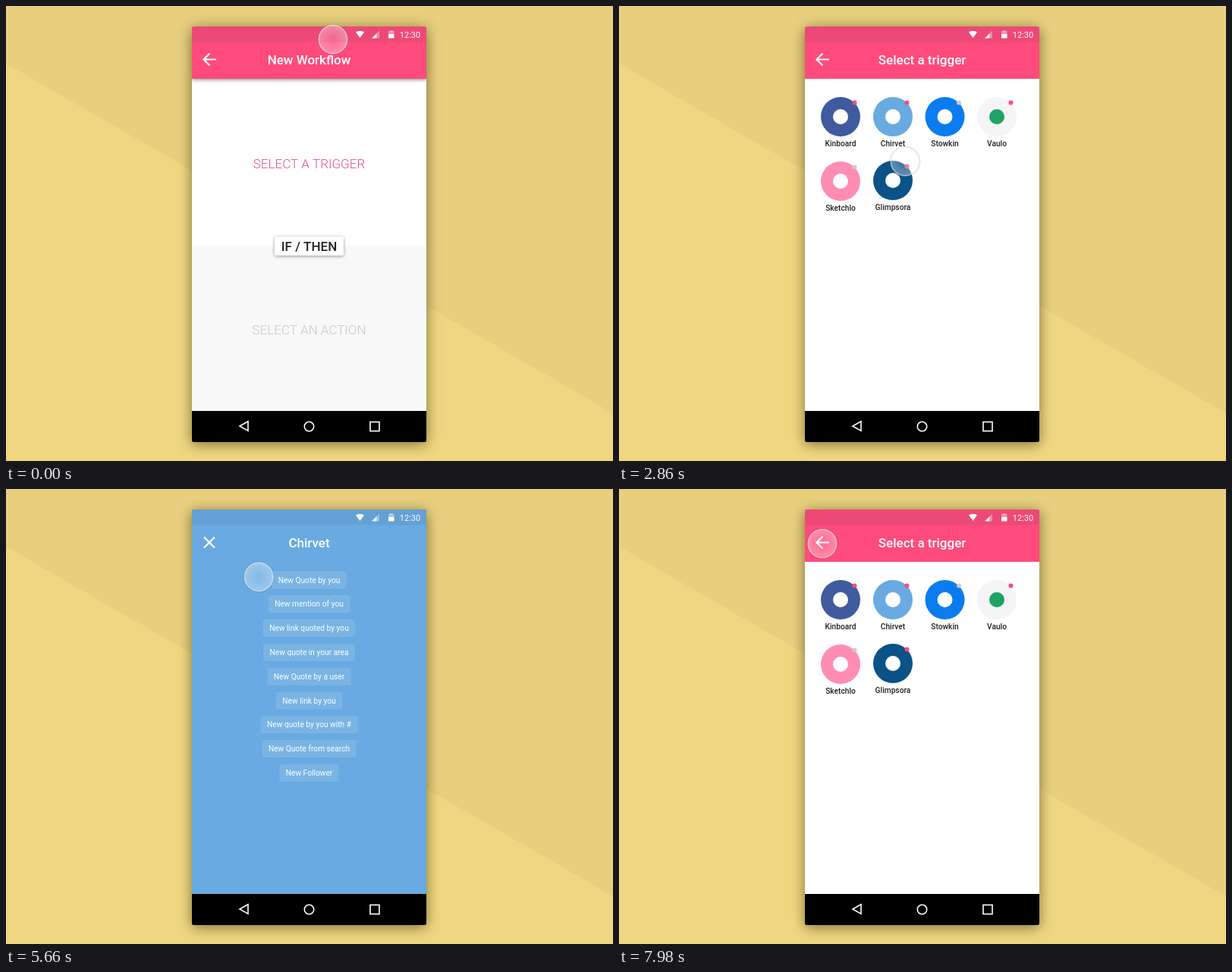
An HTML page with a canvas that plays this animation: 800 px wide and 600 px high, repeating every 8 s.

```html
<!DOCTYPE html>
<html lang="en">
<head>
<meta charset="utf-8">
<title>Workflow builder</title>
<style>
  html, body { margin: 0; width: 100%; height: 100%; overflow: hidden; background: #efd781; }
  canvas { display: block; width: 800px; height: 600px; }
</style>
</head>
<body>
<canvas id="stage" width="800" height="600"></canvas>
<script>
const ctx = document.getElementById('stage').getContext('2d');
const LOOP = 8000, PINK = '#ff4b7b', BLUE = '#68aae1';
const PHONE = { x: 245, y: 27, w: 309, h: 548 };
const MID = 399.5, NAV_TOP = 534;

const apps = [
  { name: 'Kinboard', x: 292, y: 146, fill: '#3f5a9d', dot: PINK },
  { name: 'Chirvet', x: 361, y: 146, fill: BLUE, dot: PINK },
  { name: 'Stowkin', x: 429.5, y: 146, fill: '#0a7cf0', dot: '#c9ccd0' },
  { name: 'Vaulo', x: 498, y: 146, fill: '#f5f5f5', dot: PINK, mark: '#1da362' },
  { name: 'Sketchlo', x: 292, y: 231, fill: '#ff8db3', dot: '#c9ccd0' },
  { name: 'Glimpsora', x: 361, y: 230, fill: '#0a5287', dot: PINK },
];
const chosen = apps[1];
const chips = [
  'New Quote by you', 'New mention of you', 'New link quoted by you',
  'New quote in your area', 'New Quote by a user', 'New link by you',
  'New quote by you with #', 'New Quote from search', 'New Follower',
];

// Timing helpers
const span = (t, from, to) => Math.min(1, Math.max(0, (t - from) / (to - from)));
const smooth = p => p * p * (3 - 2 * p);
const easeOut = p => 1 - (1 - p) ** 3;
const lerp = (a, b, p) => a + (b - a) * p;

// Drawing helpers
function withAlpha(alpha, draw) {
  if (alpha <= 0) return;
  ctx.save();
  ctx.globalAlpha *= alpha;
  draw();
  ctx.restore();
}
function rect(x, y, w, h, fill) {
  ctx.fillStyle = fill;
  ctx.fillRect(x, y, w, h);
}
function roundRect(x, y, w, h, r, fill) {
  ctx.beginPath();
  ctx.roundRect(x, y, w, h, r);
  ctx.fillStyle = fill;
  ctx.fill();
}
function disc(x, y, r, fill) {
  ctx.beginPath();
  ctx.arc(x, y, r, 0, Math.PI * 2);
  ctx.fillStyle = fill;
  ctx.fill();
}
function polygon(points, fill) {
  ctx.beginPath();
  points.forEach(([x, y]) => ctx.lineTo(x, y));
  ctx.closePath();
  ctx.fillStyle = fill;
  ctx.fill();
}
function strokeLines(lines, width) {
  ctx.beginPath();
  for (const [first, ...rest] of lines) {
    ctx.moveTo(...first);
    rest.forEach(p => ctx.lineTo(...p));
  }
  ctx.lineWidth = width;
  ctx.strokeStyle = '#fff';
  ctx.stroke();
}
function text(str, x, y, size, weight, fill) {
  ctx.font = `${weight} ${size}px Roboto, sans-serif`;
  ctx.textAlign = 'center';
  ctx.textBaseline = 'alphabetic';
  ctx.fillStyle = fill;
  ctx.fillText(str, x, y + size * 0.355);
}
function shadowed(color, blur, dy, draw) {
  ctx.save();
  ctx.shadowColor = color;
  ctx.shadowBlur = blur;
  ctx.shadowOffsetY = dy;
  draw();
  ctx.restore();
}
const title = (str, y = 70.5) => text(str, MID, y, 17, 500, '#fff');

function drawBackdrop() {
  rect(0, 0, 800, 600, '#efd781');
  polygon([[0, 0], [800, 0], [800, 537], [0, 76]], '#e7cf7e');
  shadowed('rgba(50,40,0,.6)', 18, 3, () =>
    roundRect(PHONE.x, PHONE.y, PHONE.w, PHONE.h, 3, '#000'));
}

function drawStatus() {
  rect(PHONE.x, PHONE.y, PHONE.w, 20.5, 'rgba(60,60,80,.09)');
  polygon([[461, 34.5], [464, 33], [469, 33], [472, 34.5], [466.5, 42]], '#fff');
  polygon([[482, 42.5], [492, 42.5], [492, 32.5]], 'rgba(255,255,255,.35)');
  polygon([[482, 42.5], [488.5, 42.5], [488.5, 36]], 'rgba(255,255,255,.85)');
  rect(506, 32, 3.5, 2, 'rgba(255,255,255,.4)');
  rect(504, 33, 7.5, 4, 'rgba(255,255,255,.4)');
  rect(504, 37, 7.5, 5.5, '#fff');
  text('12:30', 532.5, 37.8, 11, 400, '#fff');
}

function drawNav() {
  roundRect(PHONE.x, NAV_TOP, PHONE.w, 41, [0, 0, 3, 3], '#000');
  strokeLines([[[308, 554], [319, 547.8], [319, 560.2], [308, 554], [319, 547.8]]], 1.6);
  ctx.beginPath();
  ctx.arc(MID, 554.5, 6.2, 0, Math.PI * 2);
  ctx.stroke();
  ctx.strokeRect(480, 548.5, 12, 12);
}

function drawWorkflow(leave) {
  const split = lerp(316.5, NAV_TOP, smooth(leave));
  rect(PHONE.x, split, PHONE.w, NAV_TOP - split, '#f8f8f8');
  withAlpha(1 - span(leave, 0, 0.6), () => {
    text('SELECT A TRIGGER', MID, 207.5, 17, 300, '#e0537f');
    text('SELECT AN ACTION', MID, 426.5 + split - 316.5, 17, 300, '#c8c8c8');
    const y = split - 12.5;
    shadowed('rgba(0,0,0,.4)', 4, 1, () => roundRect(354, y, 91, 25, 2, '#fff'));
    text('IF / THEN', MID, y + 12.5, 17, 500, '#222');
  });
}

function drawMark(app, scale) {
  disc(app.x, app.y, 10 * scale, app.mark || '#fff');
}
const drawDot = (app, scale) => disc(app.x + 18.5, app.y - 18.5, 3 * scale, app.dot);
const drawLabel = app => text(app.name, app.x, app.y + 35.5, 10.2, 500, '#222');

function drawGrid(t, s) {
  apps.forEach((app, i) => {
    const pop = easeOut(span(t, 2300 + i * 40, 2550 + i * 40));
    if (!pop || app === chosen) return;
    disc(app.x, app.y, 26 * pop, app.fill);
    drawMark(app, pop);
    drawDot(app, pop);
    withAlpha(pop, () => drawLabel(app));
  });
  const pop = easeOut(span(t, 2340, 2590));
  if (!pop) return;
  disc(chosen.x, chosen.y, lerp(26 * pop, 440, s.open), chosen.fill);
  withAlpha(s.mark, () => {
    drawMark(chosen, pop);
    drawDot(chosen, pop);
  });
  withAlpha(s.label * pop, () => drawLabel(chosen));
}

function drawChips(shift) {
  chips.forEach((label, i) => {
    const x = MID - shift * (106 + 45 * i), y = 120 + i * 31.8;
    ctx.font = '400 10.2px Roboto, sans-serif';
    const w = ctx.measureText(label).width + 17;
    roundRect(x - w / 2, y - 11.5, w, 23, 3, 'rgba(255,255,255,.12)');
    text(label, x, y, 10.2, 400, '#fff');
  });
}

// Back arrow and cross share one rotation and crossfade.
function drawHeaderIcon(turn, cross) {
  ctx.save();
  ctx.translate(268, 70.5);
  ctx.rotate(turn * Math.PI);
  withAlpha(1 - cross, () =>
    strokeLines([[[9, 0], [-7, 0]], [[0.5, -8], [-7.5, 0], [0.5, 8]]], 2.2));
  withAlpha(cross, () => strokeLines([[[-7, -7], [7, 7]], [[7, -7], [-7, 7]]], 2.2));
  ctx.restore();
}

function cursorAt(t) {
  if (t < 3300) {
    const p = smooth(span(t, 0, 1000));
    return [lerp(431, 377, p), lerp(44, 205, p)];
  }
  if (t < 5270) {
    const p = smooth(span(t, 3300, 3900));
    return [lerp(377, 365, p), lerp(205, 146, p)];
  }
  const p = smooth(span(t, 5270, 6220)), q = 1 - p;
  const curve = (a, b, c) => q * q * a + 2 * p * q * b + p * p * c;
  return [curve(365, 325, 268), curve(146, 103, 72)];
}

function drawCursor(x, y) {
  const glow = ctx.createRadialGradient(x, y, 4, x, y, 19);
  glow.addColorStop(0, 'rgba(255,255,255,.2)');
  glow.addColorStop(1, 'rgba(255,255,255,.36)');
  disc(x, y, 19, glow);
  for (const [r, width, color] of [[19.8, 1.6, 'rgba(0,0,0,.09)'], [18.8, 1.6, 'rgba(228,228,228,.6)']]) {
    ctx.beginPath();
    ctx.arc(x, y, r, 0, Math.PI * 2);
    ctx.lineWidth = width;
    ctx.strokeStyle = color;
    ctx.stroke();
  }
}

function render(t) {
  const leave = span(t, 2150, 2450);
  const closing = t >= 7215;
  const enter = easeOut(span(t, 4500, 4960));
  const s = closing ? {
    open: 1 - smooth(span(t, 7215, 7450)),
    mark: span(t, 7270, 7370),
    label: span(t, 7250, 7350),
    pickTitle: span(t, 7220, 7300),
    detailTitle: 1 - span(t, 7215, 7290),
    chips: ((t - 7220) / 100) ** 2,
    turn: 1 - smooth(span(t, 7280, 7700)),
    cross: 1 - span(t, 7270, 7370),
    status: 0,
  } : {
    open: smooth(span(t, 4200, 4500)),
    mark: 1 - span(t, 4200, 4320),
    label: 1 - span(t, 4200, 4320),
    pickTitle: span(t, 2300, 2450) * (1 - span(t, 4250, 4400)),
    detailTitle: span(t, 4500, 4600),
    chips: 3 * (1 - easeOut(span(t, 4350, 4760))),
    turn: enter,
    cross: span(t, 4500, 4580),
    status: span(t, 4450, 4550),
  };

  drawBackdrop();
  ctx.save();
  ctx.beginPath();
  ctx.roundRect(PHONE.x, PHONE.y, PHONE.w, NAV_TOP - PHONE.y, [3, 3, 0, 0]);
  ctx.clip();
  rect(PHONE.x, PHONE.y, PHONE.w, PHONE.h, '#fff');
  if (leave < 1) drawWorkflow(leave);
  shadowed(`rgba(0,0,0,${0.5 * (1 - leave)})`, 5, 1, () =>
    rect(PHONE.x, PHONE.y, PHONE.w, 69, PINK));
  drawStatus();
  drawGrid(t, s);
  withAlpha(s.status, drawStatus);
  withAlpha(1 - span(t, 2150, 2300), () => title('New Workflow'));
  withAlpha(s.pickTitle, () => title('Select a trigger'));
  withAlpha(s.detailTitle, () => title(chosen.name, 70.5 + 29 * (1 - enter)));
  if (t > 4350 && s.chips < 5) drawChips(s.chips);
  drawHeaderIcon(s.turn, s.cross);
  ctx.restore();
  drawNav();
  drawCursor(...cursorAt(t));
}

function frame(now) {
  render(now % LOOP);
  requestAnimationFrame(frame);
}
requestAnimationFrame(frame);
</script>
</body>
</html>
```
